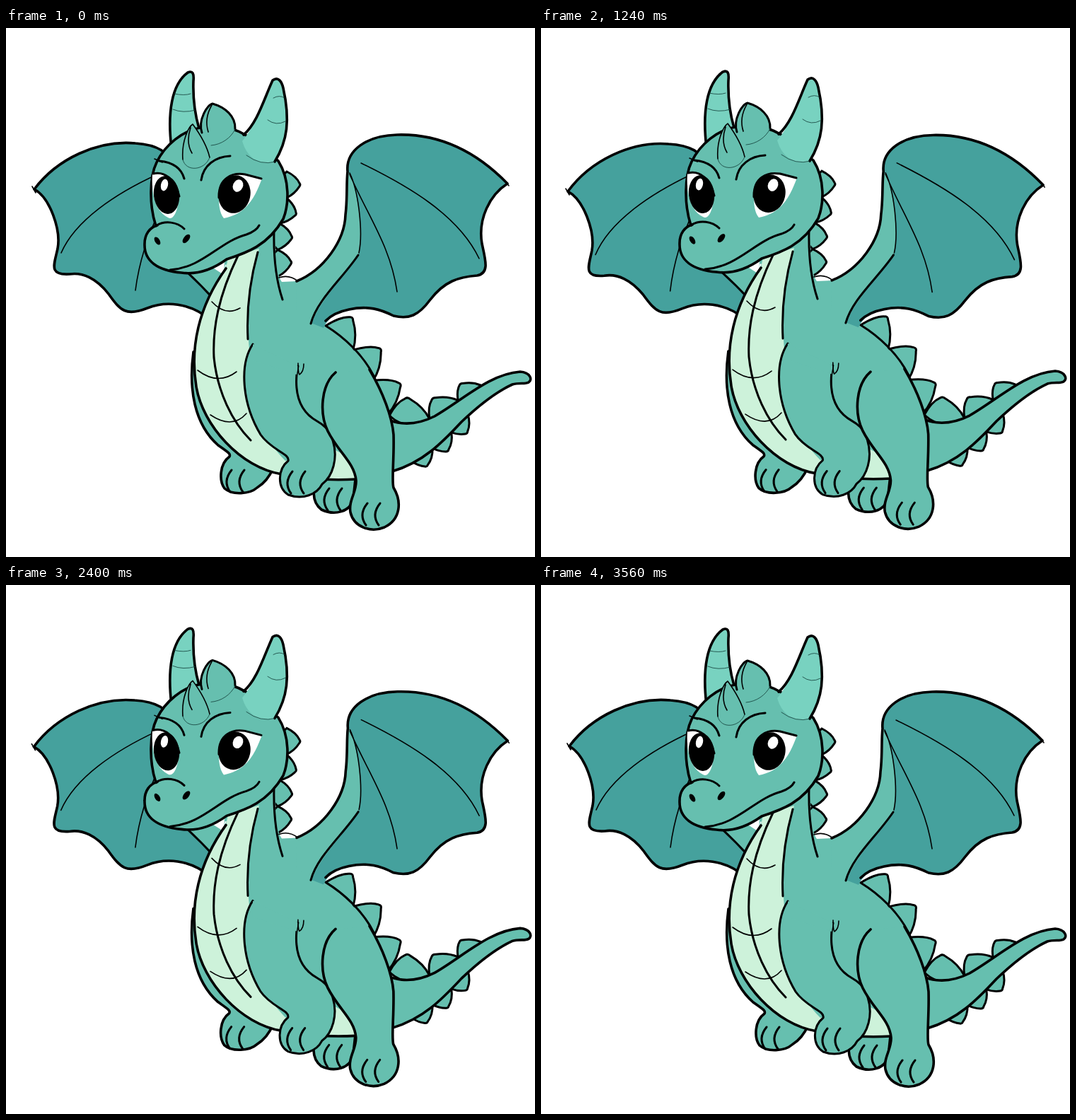
Write an HTML page that moves like this. It is 748 px wide and 748 px high and loops after 3.6 s.

```html
<!DOCTYPE html>
<html lang="en">
<head>
<meta charset="utf-8">
<title>Flying dragon</title>
<style>
html, body { margin: 0; width: 100%; height: 100%; overflow: hidden; background: #fff; }
svg { display: block; width: 100%; height: 100%; }
path { stroke-linecap: round; stroke-linejoin: round; }
.line { fill: none; stroke: #000; stroke-width: 3; }
.thin { fill: none; stroke: #000; stroke-width: 1.6; }
.hair { fill: none; stroke: #123d38; stroke-width: .8; }
.skin { fill: #66bfaf; }
.horn { fill: #78d2c0; }
.wing { fill: #45a19d; }
.belly { fill: #cdf2da; }
.white { fill: #fff; }
.edge { stroke: #000; stroke-width: 3.6; }
</style>
</head>
<body>
<svg viewBox="0 0 748 748">
<g id="dragon">
  <g id="wingL">
    <path class="wing edge" d="M40 228C72 185 130 158 183 163C212 165 232 174 239 200L300 400L288 412C260 388 225 386 200 396C170 408 162 400 145 376C128 354 108 345 90 348C60 350 68 335 73 312C78 285 62 240 40 228Z"/>
    <path class="skin" d="M222 316L312 326L298 390Q262 350 222 316Z"/>
    <path class="line" d="M225 318Q262 348 298 388"/>
    <path class="thin" d="M214 207C155 234 98 272 78 318M234 226Q192 300 183 371M37 224L42 233"/>
  </g>

  <g id="spikes"></g>
  <path class="skin edge" d="M522 540C542 562 574 565 606 549C646 526 684 489 727 486C741 487 745 497 739 501C734 504 726 501 716 504C690 516 664 538 644 557C617 586 590 614 546 627L520 630Z"/>

  <g id="hindFar">
    <path class="skin edge" d="M444 630C432 650 432 670 446 681C465 690 487 684 491 666L494 638L480 590Z"/>
  </g>
  <g id="foreFar">
    <path class="skin edge" d="M265 458C258 510 266 560 300 590C314 600 318 602 316 606C302 616 301 640 309 651C320 661 345 659 355 650C365 644 372 636 378 622L350 590L285 490Z"/>
  </g>

  <!-- torso -->
  <path class="skin" d="M300 332L382 285C379 330 384 350 390 359L412 358L445 398L452 422C484 442 510 470 526 520L522 632L460 637C400 640 350 620 310 585C270 545 262 500 268 450C272 410 290 370 312 335Z"/>
  <path class="belly" d="M311 340C272 394 260 452 269 507C278 562 332 622 390 631Q440 641 495 638L495 612L462 595L395 612C345 560 330 490 344 455C340 410 343 360 358 312L314 325Z"/>
  <path class="white" d="M291 338L309 329L308 349Z"/>
  <path class="line edge" d="M311 340C272 394 260 452 269 507C278 562 332 622 390 631Q440 641 495 638"/>
  <path class="line" d="M328 322C300 380 292 425 294 466C299 515 320 557 346 583M356 317C344 360 340 400 342 440M379 287C378 330 383 360 391 384M452 421C478 437 505 462 520 492"/>
  <path class="thin" d="M291 387Q310 408 331 396M271 484Q300 506 326 486M289 547Q320 568 340 545M386 353Q400 348 413 358"/>

  <g id="wingR">
    <path class="wing" d="M484 205C480 173 510 152 553 151C620 149 670 180 709 220C684 236 667 270 673 305C678 328 684 347 666 350C640 352 620 358 600 384C583 407 570 412 548 407C530 398 512 392 485 398C465 402 455 412 449 424L431 417C440 388 478 354 499 318Z"/>
    <path class="skin" d="M411 358C450 342 481 300 481 264C482 240 481 220 484 203C499 232 505 290 499 318C476 354 445 384 432 418L410 400Z"/>
    <path class="line edge" d="M411 358C450 342 479 300 480 264C483 240 481 220 483 203C480 173 510 152 553 151C620 149 670 180 709 220C684 236 667 270 673 305C678 328 684 347 666 350C640 352 620 358 600 384C583 407 570 412 548 407C530 398 512 392 485 398C470 401 459 407 452 414"/>
    <path class="line" d="M498 321C476 354 440 384 431 418"/>
    <path class="thin" d="M486 205C499 232 505 290 499 318M502 191C570 224 640 265 669 326M486 207C514 270 544 310 553 373M706 217L711 223"/>
  </g>

  <g id="foreNear">
    <path class="skin line" style="fill:#66bfaf" d="M349 447C330 475 333 530 360 575C375 597 402 602 399 612C384 624 383 650 399 660C420 668 440 659 447 645C462 634 470 608 462 583C457 566 447 560 440 556C420 545 408 525 411 490L413 478"/>
    <path class="skin" d="M349 447L413 478L411 490L349 470Z"/>
    <path class="thin" d="M413 474Q413 488 415 490Q421 486 421 475"/>
  </g>
  <g id="hindNear">
    <path class="skin edge" d="M466 487C445 505 443 545 455 570C470 600 493 615 495 640C496 656 484 668 487 685C492 706 516 714 535 706C558 695 560 670 548 650C545 640 549 610 548 575C546 550 533 515 514 483"/>
  </g>

  <!-- head -->
  <path class="horn edge" d="M234 170C228 120 234 80 257 63C264 60 266 64 265 75C264 105 268 125 273 142Z"/>
  <path class="skin edge" d="M212 280C202 250 203 210 213 190C225 165 250 145 275 141Q310 134 340 152L385 188C402 215 400 250 392 270C370 308 340 318 312 327C290 343 270 349 248 346C215 343 195 330 196 305C196 292 203 282 214 279Z"/>
  <path class="horn" d="M334 160C355 135 365 100 377 74C385 68 390 76 392 85C402 130 398 160 380 189C360 194 342 186 334 160Z"/>
  <path class="line edge" d="M336 151C355 135 365 100 377 74C385 68 390 76 392 85C402 130 398 160 380 189"/>
  <path class="skin" d="M276 152C271 130 285 108 292 107C310 112 325 125 324 143C320 160 300 168 287 166Z"/>
  <path class="line" d="M277 148C271 130 285 108 292 107C310 112 325 125 324 143"/>
  <path class="thin" d="M286 147Q280 128 291 109"/>
  <path class="skin" d="M250 186C248 160 258 140 264 136C278 155 285 170 288 183C281 202 254 204 250 186Z"/>
  <path class="thin" d="M250 186C248 160 258 140 264 136C278 155 285 170 288 183M263 177Q254 162 261 141"/>
  <path class="hair" d="M250 186C254 204 281 202 288 183M324 143C318 156 304 165 290 166M238 93Q252 96 261 93M236 115Q250 121 268 116M378 99Q387 94 394 99M370 130Q382 139 395 132M340 180Q360 195 381 189"/>

  <path class="white" d="M207 207C224 201 240 215 245 238C243 258 237 273 229 268C212 260 205 235 207 207Z"/>
  <path class="white" d="M301 240C300 215 318 204 335 206L362 213C354 232 345 262 308 269C302 262 301 250 301 240Z"/>
  <ellipse cx="227" cy="236" rx="18" ry="27" transform="rotate(-7 227 236)"/>
  <ellipse cx="323" cy="235" rx="22.5" ry="27" transform="rotate(12 323 235)"/>
  <ellipse class="white" cx="224" cy="222" rx="5" ry="8.5" transform="rotate(12 224 222)"/>
  <ellipse class="white" cx="328" cy="223" rx="7" ry="9" transform="rotate(24 328 223)"/>
  <path class="line" d="M208 206C224 202 240 214 245 238M301 240C300 212 320 204 338 207L361 213M217 188C236 190 248 198 252 213M276 215C279 194 296 182 317 181"/>
  <path class="thin" d="M210 185L221 190"/>
  <path class="line" d="M213 279C225 272 242 274 252 284M232 342C278 339 302 302 340 292Q354 287 358 279"/>
  <ellipse cx="214" cy="301" rx="3.4" ry="6.2" transform="rotate(-32 214 301)"/>
  <ellipse cx="255" cy="298" rx="3.8" ry="7.2" transform="rotate(38 255 298)"/>
</g>
</svg>
<script>
const LOOP = 3600, BEAT = 1180;

// Height of each wing beat; the dragon rests between the last one and the loop
const BEATS = [
  { lift: 19.5, left: 1.01, right: .82, swing: 8.5 },
  { lift: 14.4, left: 1.03, right: 1.03, swing: 13.3 },
  { lift: 17.2, left: .62, right: .6, swing: 9.3 }
];
const REST = { lift: 0, left: 0, right: 0, swing: 0 };

const part = id => document.getElementById(id);

function addPath(parent, type, d) {
  const path = document.createElementNS('http://www.w3.org/2000/svg', 'path');
  path.setAttribute('class', type);
  path.setAttribute('d', d);
  parent.append(path);
  return path;
}

// A row of spikes on the left-hand side of a curve, each `shrink` times the one before
function spikes(d, count, lean, height, shrink = 1) {
  const base = addPath(part('spikes'), 'hair', d);
  let sum = 0;
  for (let i = 0; i < count; i++) sum += shrink ** i;
  let len = base.getTotalLength() / sum, pos = 0;
  for (let i = 0; i < count; i++) {
    const a = base.getPointAtLength(pos), b = base.getPointAtLength(pos + len);
    const dx = b.x - a.x, dy = b.y - a.y, l = Math.hypot(dx, dy);
    const at = (u, h) => `${a.x + dx * u + dy / l * h} ${a.y + dy * u - dx / l * h}`;
    const h = height * shrink ** i;
    addPath(part('spikes'), 'skin line', `M${at(0, 0)}Q${at(lean * .35, h * .72)} ${at(lean - .06, h * .96)}`
      + `Q${at(lean, h * 1.06)} ${at(lean + .07, h * .94)}`
      + `Q${at(lean + (1 - lean) * .7, h * .6)} ${at(1, 0)}Q${at(.5, -22)} ${at(0, 0)}`).style.fill = '#66bfaf';
    pos += len;
    len *= shrink;
  }
  base.remove();
}

spikes('M397 203Q402 235 388 271Q382 300 385 351', 4, .5, 19);
spikes('M452 421C490 446 515 480 540 546', 3, .4, 33);
spikes('M542 548C565 566 590 558 606 549C628 537 645 520 671 505', 3, .42, 27, .8);
spikes('M653 546Q625 583 574 613', 3, .6, 17);

const legs = [
  { id: 'foreFar', hip: 430, shear: .005, stretch: .003, toe: [319, 625] },
  { id: 'foreNear', hip: 420, shear: .0045, stretch: .0023, toe: [405, 627] },
  { id: 'hindNear', hip: 470, shear: .0038, stretch: .0005, toe: [511, 672] },
  { id: 'hindFar', hip: 560, shear: .0075, stretch: 0, toe: [457, 651] }
];
for (const leg of legs) {
  leg.el = part(leg.id);
  const [x, y] = leg.toe;
  for (const gap of [0, 18]) addPath(leg.el, 'line', `M${x + gap} ${y}q-13 16 -2 31`);
}

// Linear map around the fixed point x, y
function place(el, a, b, c, d, x, y) {
  const e = x - a * x - c * y, f = y - b * x - d * y;
  el.setAttribute('transform', `matrix(${[a, b, c, d, e, f].map(n => n.toFixed(5))})`);
}

function draw(now) {
  const t = now % LOOP;
  const beat = BEATS[Math.floor(t / BEAT)] || REST;
  const rise = Math.sin(Math.PI * (t % BEAT) / BEAT) ** 1.5;
  const left = beat.left * rise, right = beat.right * rise, swing = beat.swing * rise;

  part('dragon').setAttribute('transform', `translate(0 ${(-beat.lift * rise).toFixed(2)})`);
  place(part('wingL'), 1, -.22 * left, .17 * left, 1, 310, 400);
  place(part('wingR'), 1, .157 * right, -.095 * right, 1, 422, 390);
  for (const { el, hip, shear, stretch } of legs)
    place(el, 1, 0, -shear * swing, 1 + stretch * swing, 0, hip);
}

const start = performance.now();
function frame() {
  draw(performance.now() - start);
  requestAnimationFrame(frame);
}
frame();
</script>
</body>
</html>
```
